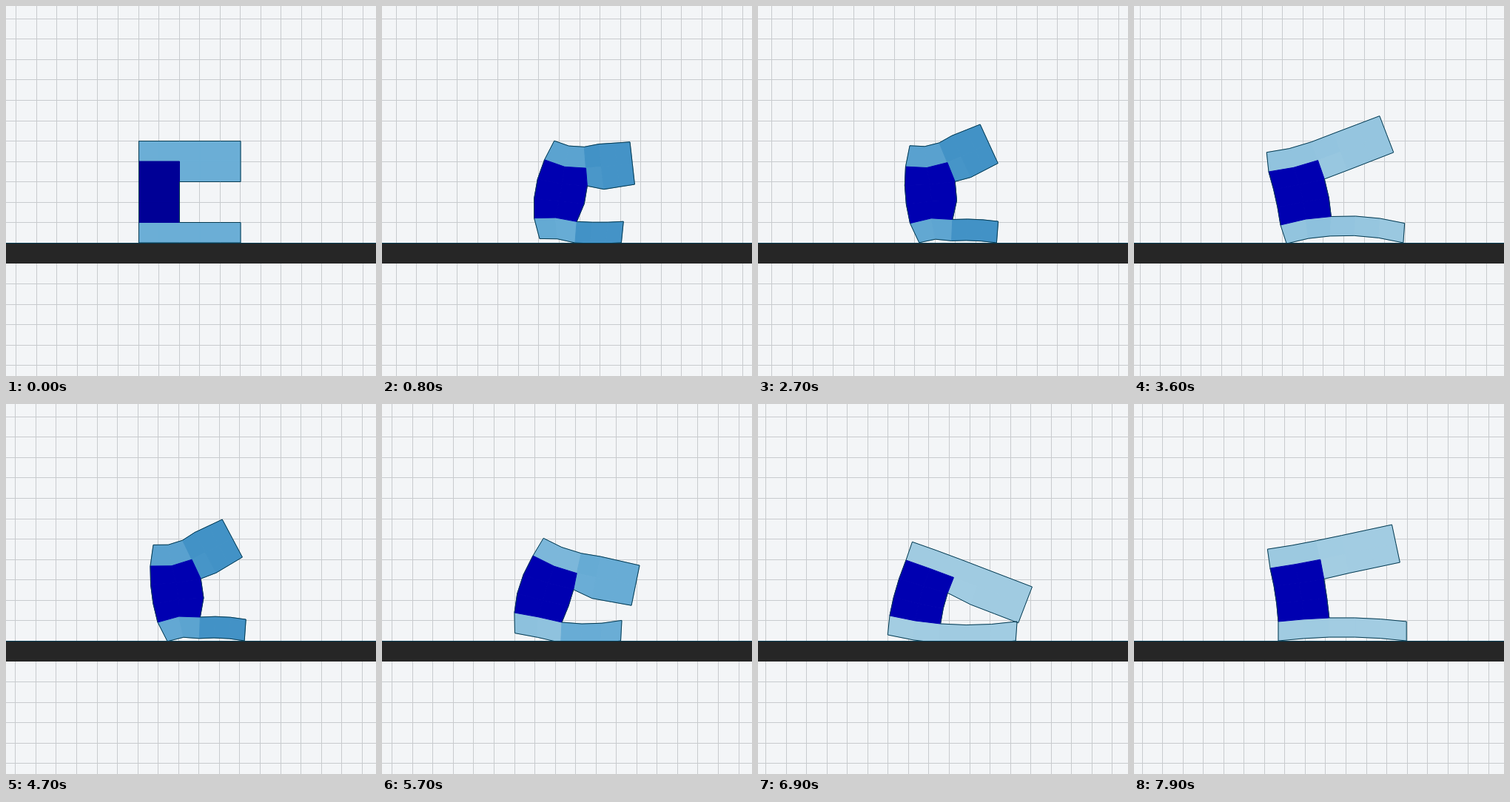
Recreate the animation shown at these times as an HTML page with a canvas. Size 500x500 px, loop 8000 ms.

```html
<!DOCTYPE html>
<html lang="en">
<head>
<meta charset="utf-8">
<title>Walking soft robot</title>
<style>
html, body { margin: 0; width: 100%; height: 100%; overflow: hidden; background: #f3f5f7; }
canvas { display: block; width: 100vw; height: 100vh; }
</style>
</head>
<body>
<canvas id="stage" width="500" height="500"></canvas>
<script>
const ctx = document.getElementById('stage').getContext('2d');
const SIZE = 500, CELL = 27.5, GRID = 27.553, GROUND = 320;
const LOOP = 8000, STEP = 100;

// neck: left end of the upper bar's middle line; tilt: its slope at neck and head.
// foot: heel x, heel y, knee y; lean: slope of the foot's ends; width: voxels near and far
// from the spine; sway: grid offset as the camera follows. Angles are in degrees.
const REST = { neck: [179.5, 210], tilt: [0, 0], foot: [179.5, 292.5, 292.5], lean: [0, 0],
  width: [CELL, CELL], sway: [13.69] };

const GAIT = [
  { neck: [221, 208], tilt: [27, -8], foot: [208, 287, 291], lean: [-16, 6],   // squat
    width: [28.5, 20.5], sway: [13.69] },
  { neck: [204, 205], tilt: [31, 11.5], foot: [179, 282, 295], lean: [-1, 3],  // push
    width: [32, 27], sway: [13.7] },
  { neck: [200, 211], tilt: [19, 21], foot: [178, 286, 297], lean: [6, 4],     // dive
    width: [34.3, 34.5], sway: [10.5] },
  { neck: [184, 222], tilt: [-8, -12], foot: [195, 294, 289], lean: [0, 0],    // land
    width: [34.4, 34.8], sway: [11] },
  { neck: [182, 224], tilt: [-6, -21], foot: [198, 296, 284.5], lean: [-18, 4], // rear
    width: [34.2, 33.1], sway: [8] },
  { neck: [195, 219], tilt: [8, -28], foot: [205, 295, 288], lean: [-27, 4],   // tuck
    width: [28.7, 20.6], sway: [12.87] }
];

// Seconds to gait position: one unit per pose.
const PACE = [[0, 1], [1.7, 12], [3.6, 22], [4.7, 29], [5.7, 37], [6.9, 44], [7.9, 51]];

const mix = (a, b, k) => a + (b - a) * k;
const mixAll = (a, b, k) => a.map((v, i) => mix(v, b[i], k));
const clamp = (v, lo, hi) => Math.max(lo, Math.min(hi, v));
const dist = (p, q) => Math.hypot(p[0] - q[0], p[1] - q[1]);
const columns = fn => Array.from({ length: 6 }, (_, c) => fn(c));

function blend(a, b, k) {
  const out = {};
  for (const key in a) out[key] = mixAll(a[key], b[key], k);
  return out;
}

function phaseAt(s) {
  let i = 0;
  while (i < PACE.length - 2 && s >= PACE[i + 1][0]) i++;
  const [t0, a] = PACE[i], [t1, b] = PACE[i + 1];
  return mix(a, b, (s - t0) / (t1 - t0)) + 1e-6;
}

function poseAt(s) {
  const phase = phaseAt(s), i = Math.floor(phase), f = phase - i;
  const pose = blend(GAIT[i % 6], GAIT[(i + 1) % 6], f * f * (3 - 2 * f));
  pose.sway[0] += 6 * Math.sin(2 * Math.PI * phase);
  return s < 0.4 ? blend(REST, pose, s / 0.4) : pose;
}

// Bending happens in the two columns next to the spine.
const slope = ([start, end], c) => mix(end, start, Math.max(0, 1 - 0.47 * c)) * Math.PI / 180;

// Point at a distance above p, square to the given slope.
const above = (p, angle, d) => [p[0] + d * Math.sin(angle), p[1] - d * Math.cos(angle)];

// Expands a pose into rows of voxel corners, top to bottom.
function lattice({ neck, tilt, foot, lean, width: [near, far] }) {
  const height = CELL + (CELL - far) * 0.2;
  const squeeze = (near - far) / 8;
  const span = c => c < 2 ? near : far;

  const mid = [neck];
  for (let c = 0; c < 5; c++) {
    const angle = (slope(tilt, c) + slope(tilt, c + 1)) / 2;
    const [x, y] = mid[c];
    mid.push([x + span(c) * Math.cos(angle), y + span(c) * Math.sin(angle)]);
  }
  const thick = c => height + (c === 3 || c === 4 ? (5 - c) * squeeze : 0);
  const top = mid.map((p, c) => above(p, slope(tilt, c), thick(c)));
  const under = mid.map((p, c) => above(p, slope(tilt, c), -thick(c)));

  // The foot is a parabola through heel, knee and toe, creased beside the heel.
  const [x, heel, knee] = foot;
  const rise = (knee - heel) / 2;
  const curve = ((GROUND - height - knee) / 3 - rise) / 5;
  const instep = columns(c => [
    x + near * Math.min(c, 2) + far * Math.max(c - 2, 0),
    heel + rise * c + curve * c * (c - 2) - (c === 1 ? 3.5 * squeeze : 0)]);
  const sole = instep.map((p, c) => above(p, slope(lean, c), -height));

  // The spine bows against the head and bulges when squeezed.
  const spine = k => columns(c => {
    const [px, py] = mixAll(mid[c], instep[c], k);
    return [px - 0.1 * tilt[1] + (c - 1) * 5.5 * squeeze, py];
  });
  const chest = [...spine(1 / 3).slice(0, 3), ...under.slice(3)];
  return [top, mid, chest, spine(2 / 3), instep, sole];
}

const SHORT = [66, 146, 198], NORMAL = [107, 174, 214], LONG = [158, 202, 225];

function lightColor(width) {
  const k = clamp((width - CELL) / 6.8, -1, 1.1);
  const rgb = mixAll(NORMAL, k < 0 ? SHORT : LONG, Math.abs(k));
  return `rgb(${rgb.map(Math.round)})`;
}

const darkColor = width => `rgb(0,0,${Math.round(150 + clamp((width - CELL) * 8, 0, 27))})`;

function path(points) {
  ctx.beginPath();
  points.forEach(p => ctx.lineTo(p[0], p[1]));
  ctx.closePath();
}

function drawVoxel(rows, r, c, color) {
  const a = rows[r][c], b = rows[r][c + 1], d = rows[r + 1][c + 1], e = rows[r + 1][c];
  path([a, b, d, e]);
  ctx.fillStyle = ctx.strokeStyle = color((dist(a, b) + dist(e, d)) / 2);
  ctx.lineWidth = 1;
  ctx.fill();
  ctx.stroke();
}

function drawBody(rows) {
  for (let c = 0; c < 5; c++) {
    drawVoxel(rows, 0, c, lightColor);
    drawVoxel(rows, 4, c, lightColor);
    if (c > 1) drawVoxel(rows, 1, c, lightColor);
  }
  for (let r = 1; r < 4; r++)
    for (let c = 0; c < 2; c++) drawVoxel(rows, r, c, darkColor);

  const [top, mid, chest, waist, instep, sole] = rows;
  path([
    ...top, mid[5], ...chest.slice(2).reverse(), waist[2],
    ...instep.slice(2), ...sole.slice().reverse(),
    instep[0], waist[0], chest[0], mid[0]]);
  ctx.strokeStyle = '#063a50';
  ctx.stroke();
}

function drawGrid(offset) {
  ctx.fillStyle = '#f3f5f7';
  ctx.fillRect(0, 0, SIZE, SIZE);
  ctx.fillStyle = '#c8cbce';
  const first = ((offset % GRID) + GRID) % GRID;
  for (let x = first; x < SIZE; x += GRID) ctx.fillRect(Math.floor(x), 0, 1, SIZE);
  for (let y = 17.29; y < SIZE; y += GRID) ctx.fillRect(0, Math.floor(y), SIZE, 1);
}

function drawGround() {
  ctx.fillStyle = '#262626';
  ctx.fillRect(0, GROUND, SIZE, 28);
  ctx.fillStyle = '#063a50';
  ctx.fillRect(0, GROUND, SIZE, 1);
}

const start = performance.now();

function draw() {
  const t = (performance.now() - start) % LOOP;
  const pose = poseAt(Math.floor(t / STEP) * STEP / 1000);
  drawGrid(pose.sway[0]);
  drawBody(lattice(pose));
  drawGround();
  requestAnimationFrame(draw);
}
draw();
</script>
</body>
</html>
```
